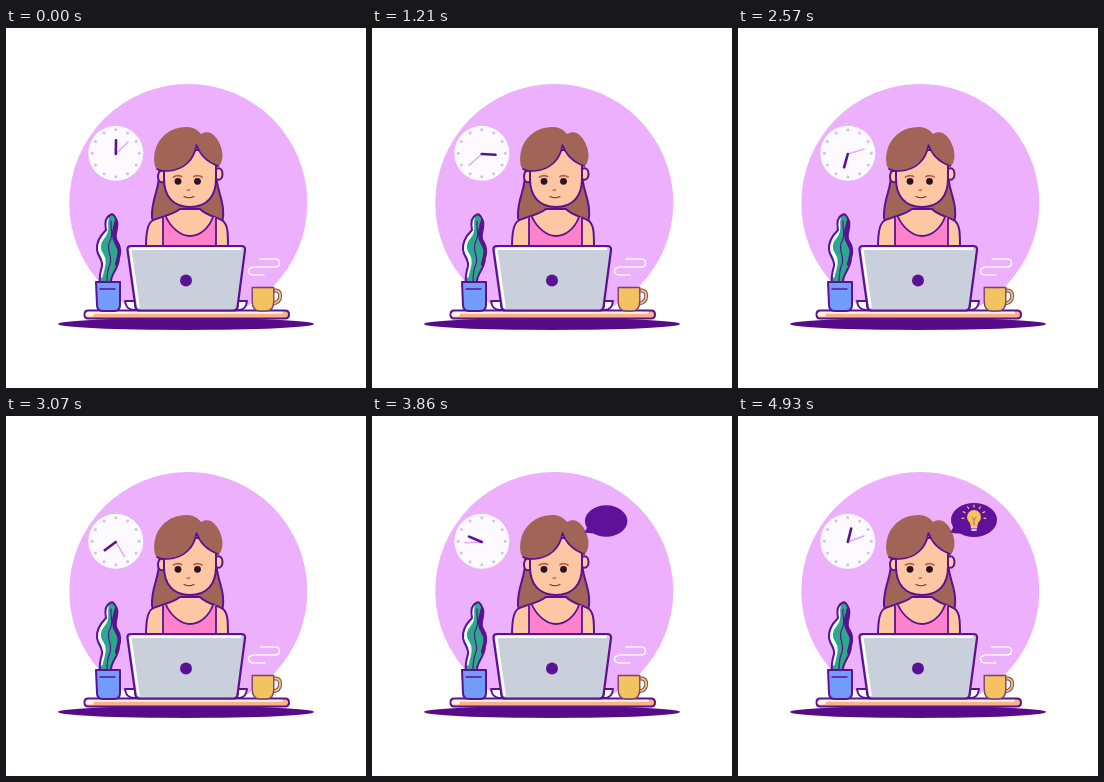
These frames come from a looping animation (360 px wide and 360 px high, 5000 ms). An HTML page with a canvas:

```html
<!DOCTYPE html>
<html lang="en">
<head>
<meta charset="utf-8">
<title>Working at the laptop</title>
<style>
  html, body { margin: 0; width: 100%; height: 100%; overflow: hidden; background: #fff; }
  canvas { display: block; width: 100vmin; height: 100vmin; }
</style>
</head>
<body>
<canvas></canvas>
<script>
const SIZE = 360, LOOP = 5000, STEPS = 70;
const INK = '#5b1292', DEEP = '#570b89', LILAC = '#ecb0fd', SKIN = '#fdc7a3',
      HAIR = '#a26456', PINK = '#fc83cb', GOLD = '#f5c261', PAPER = '#fdfaff';

const canvas = document.querySelector('canvas');
const ctx = canvas.getContext('2d');
const ratio = window.devicePixelRatio || 1;
const pixels = Math.min(innerWidth, innerHeight) * ratio || SIZE;
canvas.width = canvas.height = pixels;

function paint(path, fill, stroke, width = 2) {
  if (fill) { ctx.fillStyle = fill; ctx.fill(path); }
  if (stroke) { ctx.strokeStyle = stroke; ctx.lineWidth = width; ctx.stroke(path); }
}
const shape = (d, fill, stroke, width) => paint(new Path2D(d), fill, stroke, width);
const line = (d, color, width) => shape(d, null, color, width);

function oval(x, y, rx, ry, fill, stroke, width) {
  const path = new Path2D();
  path.ellipse(x, y, rx, ry, 0, 0, Math.PI * 2);
  paint(path, fill, stroke, width);
}
const dot = (x, y, r, fill, stroke, width) => oval(x, y, r, r, fill, stroke, width);

function scaled(x, y, scale, draw) {
  if (scale <= 0) return;
  ctx.save();
  ctx.translate(x, y);
  ctx.scale(scale, scale);
  ctx.translate(-x, -y);
  draw();
  ctx.restore();
}

function easeOut(t, start, end) {
  const p = Math.min(1, Math.max(0, (t - start) / (end - start)));
  return 1 - (1 - p) ** 3;
}

function hand(angle, length, color, width) {
  const a = angle * Math.PI / 180;
  line(`M109.8 126L${109.8 + length * Math.sin(a)} ${126 - length * Math.cos(a)}`, color, width);
}

function clock(t) {
  dot(109.8, 125.3, 27.5, PAPER);
  for (let i = 0; i < 12; i++) {
    const a = i * Math.PI / 6;
    dot(109.8 + 23.5 * Math.sin(a), 125.3 - 23.5 * Math.cos(a), 1.5, '#cfc3e4');
  }
  hand(45 + t * 0.151, 17, '#e3a8f6', 1.5);
  hand(1 + t * 0.0757, 13.8, INK, 2.6);
}

function girl() {
  // Long hair behind the shoulders
  shape('M153 144C154 162 145 170 146 190L152 206H212C215 200 218 190 217 181C216 168 210 160 210 144Z', HAIR, INK);

  // Shoulders and top
  shape('M140 219C140 206 141 196 146 193C152 189 165 188 174 181H194C201 188 211 189 217 193C222 197 222 206 222 219Z', SKIN, INK);
  shape('M157 219V189H161C166 200 175 208 184 208C194 208 203 200 207 189H210V219Z', PINK);
  line('M160 189C165 200 175 208 184 208C194 208 203 200 207 189', INK, 1.8);
  line('M157 217V190M210 217V190', INK, 1.8);

  // Head
  oval(156, 148.5, 4, 5.8, SKIN, INK);
  oval(212.5, 146, 4, 5.8, SKIN, INK);
  shape('M158 128V151C158 168 167 179 184 179C201 179 210 168 210 151V122H165Z', SKIN, INK);
  shape('M148.5 136C146 115 160 99 181 99C187 99 192 102 195 106C204 101 211 108 215 119C218 128 216 135 212.5 139C201 134 194 127 190.5 117C188 132 178 142 162 143C154 144 149 141 148.5 136Z', HAIR);
  line('M151 141C154 143 158 143 162 143C178 142 188 132 190.5 117C194 127 201 134 212 138', INK, 1.7);

  // Features
  for (const x of [172, 191.5]) dot(x, 153.3, 3.4, '#291226');
  line('M167.5 149Q171.5 146.5 175.5 148.5M188 148.5Q192 146.5 196 149', '#b15f4f', 1.7);
  line('M181 162Q182.3 163.2 183.5 161.5', '#c0705c', 1.4);
  line('M178 168.5Q183 171 188 168.5', '#7b273d', 1.1);
}

function plant() {
  const leaf = new Path2D('M104 187C98 190 99 197 100 202C94 208 90 214 91 222C92 229 97 232 96 238C94 245 93 248 94 255H105C104 246 113 241 113 230C115 224 115 219 111 213C107 207 113 201 111 193C109 188 107 185 104 187Z');
  paint(leaf, '#2ea88d');
  ctx.save();
  ctx.clip(leaf);
  line('M101 190C99 197 103 202 98 208C92 215 92 222 96 227C100 233 97 239 95 248', '#f1fbf8', 3.5);
  line('M112 192C109 202 107 208 112 216C117 223 113 230 112 236', INK, 6);
  ctx.restore();
  line('M105 193C104 201 108 206 104 213C99 221 107 228 104 236C101 243 101 248 101 254', INK, 1.2);
  paint(leaf, null, INK, 2);
  shape('M90 254H114V277Q114 283 108 283H97Q91 283 91 277Z', '#739cf8', INK);
  line('M94 261H109', INK, 1.3);
}

function laptop() {
  shape('M119 273Q120 282 128 282H233Q240 282 241 273H232V278H129V273Z', '#fff', INK);
  shape('M125 218H235Q239.5 218 239 222L231.5 279Q231 282.5 227 282.5H134Q130 282.5 129.5 279L121.5 222Q121 218 125 218Z', '#c9cfdb', INK, 2.2);
  line('M132.5 279L124.5 223Q124.3 220.7 127 220.7H234', '#fff', 2.4);
  dot(180, 252.5, 6, INK);
}

function cup(t) {
  const drift = Math.sin(t / LOOP * Math.PI * 4) * 0.7;
  line(`M${254 + drift} 231H269Q273.5 231 273.5 235Q273.5 239 269 239H248Q242.5 239.5 242.5 243.5Q243 247 248 247H${258 + drift}`, '#fff8ff', 1.5);
  const handle = 'M267 262.5H270Q274.2 263 274.2 268Q274 275 266 275.5';
  line(handle, '#79426e', 3.8);
  line(handle, GOLD, 2);
  shape('M246.2 259.5H267.8V273Q267.8 283 260 283H254Q246.2 283 246.2 273Z', GOLD, '#79426e', 1.4);
}

function table() {
  oval(180, 296, 128, 5.9, DEEP);
  shape('M82 282.5H279Q283 282.5 283 286.5Q283 290.5 279 290.5H82Q78.5 290.5 78.5 286.5Q78.5 282.5 82 282.5Z', '#fab184', INK);
  line('M82 284.8H276', '#fff5ee', 2);
  line('M81.5 286.5H86', '#fff5ee', 4);
}

function bulb() {
  dot(236, 101, 7, GOLD);
  shape('M231 104H241L239 111H233Z', GOLD);
  line('M234 101L236 104L238 101M236 104V109', '#b96c55', 1);
  line('M233.5 111.5H238.5M234 114H238', '#d6c4e5', 1.8);
  for (let i = -3; i <= 3; i++) {
    const a = i * Math.PI / 5.6;
    const x = Math.sin(a), y = -Math.cos(a);
    line(`M${236 + x * 10} ${101 + y * 10}L${236 + x * 12} ${101 + y * 12}`, GOLD, 1.2);
  }
}

function idea(t) {
  scaled(212, 117, easeOut(t, 3570, 4070), () => {
    oval(236, 104, 23, 17, '#60119a');
    shape('M217 108L212.5 116.5Q220 118 225 117Z', '#60119a');
  });
  scaled(236, 103, easeOut(t, 3900, 4250), bulb);
}

function draw(t) {
  const scale = pixels / SIZE;
  ctx.setTransform(scale, 0, 0, scale, 0, 0);
  ctx.fillStyle = '#fff';
  ctx.fillRect(0, 0, SIZE, SIZE);
  ctx.lineCap = ctx.lineJoin = 'round';
  dot(182.3, 175, 119, LILAC);
  clock(t);
  girl();
  table();
  plant();
  laptop();
  cup(t);
  idea(t);
}

const begin = performance.now();
function tick() {
  const elapsed = (performance.now() - begin) % LOOP;
  const step = Math.floor((elapsed + 5) * STEPS / LOOP) % STEPS;
  draw(step * LOOP / STEPS);
  requestAnimationFrame(tick);
}
tick();
</script>
</body>
</html>
```
